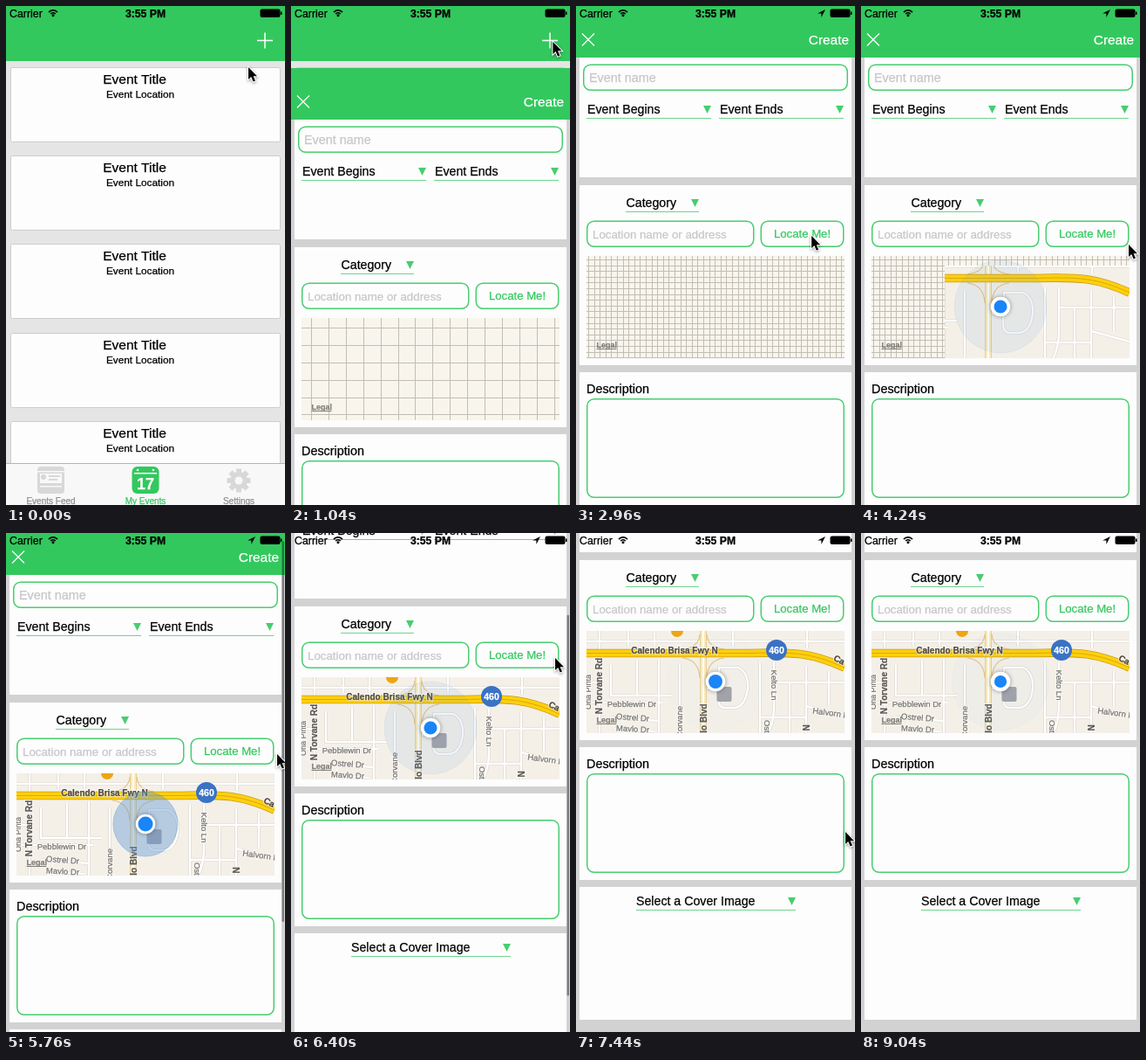
Animation, 320 px wide and 571 px high, one loop 9120 ms. Source, as an HTML page with a canvas:

```html
<!DOCTYPE html>
<html lang="en">
<head>
<meta charset="utf-8">
<title>New event</title>
<style>
html, body { margin: 0; height: 100%; overflow: hidden; }
canvas { display: block; width: 100vw; height: 100vh; }
</style>
</head>
<body>
<canvas id="stage" width="320" height="571"></canvas>
<script>
const c = document.getElementById('stage').getContext('2d');
const LOOP = 9120, STEP = 80, W = 320, H = 571, CONTENT = 745;
const GREEN = '#33c85e', BORDER = '#48cd70', WHITE = '#fdfdfd';
const FONT = '"Liberation Sans", Arial, sans-serif';

// [time, ...values]
const CURSOR = [
  [0, 278, 70], [240, 278, 70], [480, 302, 36], [800, 302, 36], [1360, 298, 49], [1600, 298, 49],
  [2200, 266, 262], [2800, 266, 262], [3600, 306, 272], [4240, 307, 273], [5300, 311, 264],
  [5600, 311, 264], [5760, 311, 253], [6400, 303, 143], [6640, 303, 138], [7100, 309, 342],
  [7440, 309, 342], [8160, 314, 310], [8400, 340, 300]
];
const SCROLL = [[5600, 0], [5760, 11], [6400, 121], [6880, 174]];
const BAR_ALPHA = [[5520, 0], [5680, 1], [6960, 1], [7280, 0]];

const ROADS = new Path2D(`M12 298H308M60 286V304M90 286V304M180 286V304M265 286V306
  M27 286V404M12 345H27M40 325V360H110M70 320V360M95 318V404M12 368H100M40 385L95 389M45 398L90 401
  M119 325V404M211 322V404M227 322V372Q227 390 220 404M264 326V404M227 345H308M264 372L308 384
  M290 332V372M245 345V404M211 385H264`);
const LOOP_ROAD = new Path2D('M164 328H186Q198 334 197 352Q194 374 180 374H170Q163 374 163 362ZM146 352H163');
const RAMPS = new Path2D(`M122 307Q141 305 142 290M170 307Q151 305 150 290M122 317Q141 319 142 340
  M170 317Q151 319 150 340`);
const FREEWAY = new Path2D('M12 311.5H200C250 310 270 311 308 328');
const BOULEVARD = new Path2D('M146 286V404');

// text, x, y, size, angle in degrees, weight, color
const LABELS = [
  ['Calendo Brisa Fwy N', 113, 308, 10, 0, 'bold', '#4f4a40'],
  ['N Torvane Rd', 26.5, 349, 10, -90, 'bold', '#5c5850'],
  ['Orla Pinta', 14, 356, 9, -90, '', '#77736b'],
  ['Pebblewin Dr', 64, 370, 9.5, 0, '', '#77736b'],
  ['Ostrel Dr', 65, 385, 9.5, 4, '', '#77736b'],
  ['Mavlo Dr', 65, 398, 9.5, 3, '', '#77736b'],
  ['Corvane', 119, 390, 9.5, -90, '', '#77736b'],
  ['lo Blvd', 146, 386, 10, -90, 'bold', '#5c5850'],
  ['Kelto Ln', 227, 348, 9.5, 90, '', '#77736b'],
  ['Ostia', 219, 399, 9.5, 90, '', '#77736b'],
  ['Halvorn Dr', 294, 380, 9.5, 8, '', '#77736b'],
  ['N', 264, 397, 10, -90, 'bold', '#5c5850'],
  ['Ca', 302, 319, 10, 28, 'bold', '#4f4a40']
];

function track(keys, t) {
  if (t <= keys[0][0]) return keys[0].slice(1);
  const i = keys.findIndex(k => k[0] > t);
  if (i < 0) return keys[keys.length - 1].slice(1);
  const a = keys[i - 1], b = keys[i], u = (t - a[0]) / (b[0] - a[0]), e = u * u * (3 - 2 * u);
  return a.slice(1).map((v, n) => v + (b[n + 1] - v) * e);
}
function rect(x, y, w, h, color) {
  c.fillStyle = color;
  c.fillRect(x, y, w, h);
}
function rounded(x, y, w, h, r, fill, line, width = 1.5) {
  c.beginPath();
  c.roundRect(x, y, w, h, r);
  if (fill) { c.fillStyle = fill; c.fill(); }
  if (line) { c.strokeStyle = line; c.lineWidth = width; c.stroke(); }
}
function disc(x, y, r, color) {
  c.beginPath();
  c.arc(x, y, r, 0, 7);
  c.fillStyle = color;
  c.fill();
}
function stroke(path, color, width) {
  c.strokeStyle = color;
  c.lineWidth = width;
  c.stroke(typeof path === 'string' ? new Path2D(path) : path);
}
// A hairline outline gives the type its slightly heavier look.
function text(s, x, y, size, color = '#000', align = 'left', weight = '') {
  c.font = `${weight} ${size}px ${FONT}`;
  c.textAlign = align;
  c.fillStyle = c.strokeStyle = color;
  c.lineWidth = 0.25;
  c.fillText(s, x, y);
  c.strokeText(s, x, y);
}
function field(x, y, w, h) {
  rounded(x, y, w, h, 8, null, BORDER);
}
function dropdown(label, x, y, left, right) {
  text(label, x, y, 14.2);
  rect(left, y + 5, right - left, 1, '#6fd48f');
  c.fillStyle = BORDER;
  c.fill(new Path2D(`M${right - 9} ${y - 9}h9l-4.5 9z`));
}

function statusBar(located) {
  text('Carrier', 4, 13, 12.4);
  text('3:55 PM', 160, 13, 12.2, '#000', 'center', 'bold');
  c.strokeStyle = '#000';
  c.lineWidth = 1.7;
  for (const r of [3.6, 6.6]) {
    c.beginPath();
    c.arc(54, 11.5, r, -Math.PI * 0.77, -Math.PI * 0.23);
    c.stroke();
  }
  disc(54, 10.7, 1.5, '#000');
  rounded(291.5, 3.5, 23, 9.5, 2, '#000');
  rect(315, 6.5, 1.5, 3.5, '#000');
  if (located) c.fill(new Path2D('M286 4L277 8.6H281.4V13z'));
}

function tabBar() {
  rect(0, 523, W, 48, '#f8f8f8');
  rect(0, 523, W, 1, '#b5b5b5');
  rounded(36, 527, 31, 31, 4, '#d8d8d8');
  rect(36, 532, 31, 1.5, '#f8f8f8');
  rect(39, 535, 25, 11, '#f8f8f8');
  disc(43, 539, 3, '#d8d8d8');
  rect(49, 537, 13, 2, '#d8d8d8');
  rect(49, 541, 10, 2, '#d8d8d8');
  rect(39, 549, 25, 1.5, '#f8f8f8');
  rounded(144.5, 527, 31, 31, 6, GREEN);
  rect(147, 534, 26, 1.5, '#fff');
  disc(151, 531, 1.3, '#fff');
  disc(169, 531, 1.3, '#fff');
  text('17', 160, 553, 18, '#fff', 'center', 'bold');
  c.save();
  c.translate(267, 543);
  disc(0, 0, 10, '#d8d8d8');
  for (let i = 0; i < 8; i++) {
    rect(-3, -13.5, 6, 6, '#d8d8d8');
    c.rotate(Math.PI / 4);
  }
  disc(0, 0, 4.5, '#f8f8f8');
  c.restore();
  text('Events Feed', 51.5, 569.5, 10, '#8f8f8f', 'center');
  text('My Events', 160, 569.5, 10, GREEN, 'center');
  text('Settings', 267, 569.5, 10, '#8f8f8f', 'center');
}

function eventList() {
  rect(0, 0, W, H, '#e5e5e5');
  for (let i = 0; i < 5; i++) {
    const y = 70.5 + Math.round(i * 101.2);
    rounded(5.5, y, 309, 85, 2, WHITE, '#cdcdcd', 1);
    text('Event Title', 147.5, y + 18.5, 15.5, '#000', 'center');
    text('Event Location', 154, y + 34.5, 11.8, '#000', 'center');
  }
  rect(0, 0, W, 63, GREEN);
  stroke('M288 39.5H306M297 30.5V48.5', '#fff', 1.5);
  tabBar();
}

function grid(x0, y0, gap, color) {
  c.fillStyle = color;
  for (let x = x0; x < 308; x += gap) c.fillRect(Math.round(x), 286, 1, 117);
  for (let y = y0; y < 403; y += gap) c.fillRect(12, Math.round(y), 296, 1);
}

function mapTiles() {
  rect(12, 286, 296, 117, '#f4f0e8');
  for (const road of [ROADS, LOOP_ROAD]) stroke(road, '#dad5cb', 3.6);
  for (const road of [ROADS, LOOP_ROAD]) stroke(road, '#fff', 2.4);
  stroke(BOULEVARD, '#e3c57c', 7.5);
  stroke(BOULEVARD, '#fbeab8', 6);
  stroke(BOULEVARD, '#fff', 2);
  stroke(RAMPS, '#e8c27a', 1.1);
  stroke(FREEWAY, '#c99a20', 9.6);
  stroke(FREEWAY, '#fdd00c', 8);
  stroke(FREEWAY, '#dca80c', 1);
}

function mapLabels() {
  disc(116, 286, 7, '#eda512');
  for (const [s, x, y, size, angle, weight, color] of LABELS) {
    c.save();
    c.translate(x, y);
    c.rotate(angle * Math.PI / 180);
    c.font = `${weight} ${size}px ${FONT}`;
    c.textAlign = 'center';
    c.strokeStyle = 'rgba(255,255,255,.7)';
    c.lineWidth = 2;
    c.strokeText(s, 0, size * 0.36);
    text(s, 0, size * 0.36, size, color, 'center', weight);
    c.restore();
  }
  disc(230, 308, 12, '#3a72c4');
  text('460', 230, 312, 10.5, '#fff', 'center', 'bold');
  rounded(161.5, 350, 17, 17, 2, '#a3a3a8');
}

function userDot(t) {
  const age = ((t - 1020) % 2160) / 1000;
  c.globalAlpha = Math.min(0.5, 1.07 * Math.exp(-age / 0.45));
  disc(160, 344, 57 * (1 - Math.exp(-age / 0.4)), '#5f97d4');
  c.strokeStyle = '#4a8fd6';
  c.lineWidth = 0.8;
  c.stroke();
  c.globalAlpha = 1;
  c.shadowColor = 'rgba(0,0,0,.4)';
  c.shadowBlur = 5;
  disc(160, 344, 11.3, '#fff');
  c.shadowColor = 'transparent';
  disc(160, 344, 7.8 + 0.7 * Math.cos((age - 0.4) * Math.PI / 1.08), '#1a85f7');
}

function map(t) {
  c.save();
  c.beginPath();
  c.rect(12, 286, 296, 117);
  c.clip();
  rect(12, 286, 296, 117, '#f8f5ed');
  if (t < 2880) grid(23, 297, 19.9, '#c3beb1');
  else grid(14, 290, 6.6, '#c2beb4');
  if (t >= 3600) {
    c.save();
    if (t < 4480) {
      c.beginPath();
      c.rect(96, 297, 212, 106);
      c.clip();
    }
    mapTiles();
    c.restore();
  }
  if (t >= 4640) mapLabels();
  text('Legal', 23.5, 391, 9, '#827f78', 'left', 'bold');
  rect(23.5, 392, 23, 1, '#827f78');
  if (t >= 3200) userDot(t);
  c.restore();
}

function form(t) {
  rect(0, 0, W, CONTENT, '#d2d2d2');
  for (const [y, h] of [[59, 137], [205, 206], [419, 152], [579, 152]]) rect(4, y, 312, h, WHITE);

  rect(0, 0, W, 59, GREEN);
  stroke('M7 31.5L21 45.5M21 31.5L7 45.5', '#fff', 1.2);
  text('Create', 313, 44, 15.4, '#fff', 'right');

  field(8.75, 67.25, 302.5, 29);
  text('Event name', 15, 87, 14.4, '#c6c6ca');
  dropdown('Event Begins', 13, 123, 12, 155);
  dropdown('Event Ends', 165, 123, 164, 307);

  dropdown('Category', 57.5, 230, 57, 141);
  field(12.75, 246.25, 191, 29);
  text('Location name or address', 19, 266, 13.3, '#c6c6ca');
  field(212.25, 246.25, 94.5, 29);
  text('Locate Me!', 259.5, 265, 13.2, GREEN, 'center');
  map(t);

  text('Description', 12, 443, 14.4);
  field(12.75, 449.75, 294.5, 112.5);
  dropdown('Select a Cover Image', 69, 600, 69, 252);
}

function cursor(x, y) {
  c.save();
  c.translate(x, y);
  const arrow = new Path2D('M0 0V14L3.2 11L5.6 16.6L8 15.6L5.6 10.2H10z');
  c.shadowColor = 'rgba(0,0,0,.4)';
  c.shadowBlur = 3;
  c.shadowOffsetY = 1;
  stroke(arrow, '#fff', 2);
  c.shadowColor = 'transparent';
  c.fillStyle = '#000';
  c.fill(arrow);
  c.restore();
}

function draw(t) {
  const scroll = track(SCROLL, t)[0];
  const rise = Math.min(1, Math.max(0, (t - 720) / 640));
  if (rise < 1) eventList();
  if (rise > 0) {
    c.save();
    c.translate(0, Math.round(H * (1 - rise) ** 3 - scroll));
    form(t);
    c.restore();
    c.globalAlpha = track(BAR_ALPHA, t)[0];
    rounded(316.5, scroll * H / CONTENT + 1, 2.5, H * H / CONTENT - 2, 1.2, 'rgba(0,0,0,.4)');
    c.globalAlpha = 1;
  }
  statusBar(t >= 2400);
  cursor(...track(CURSOR, t));
}

function tick() {
  draw(Math.floor(performance.now() % LOOP / STEP) * STEP);
  requestAnimationFrame(tick);
}
tick();
</script>
</body>
</html>
```
